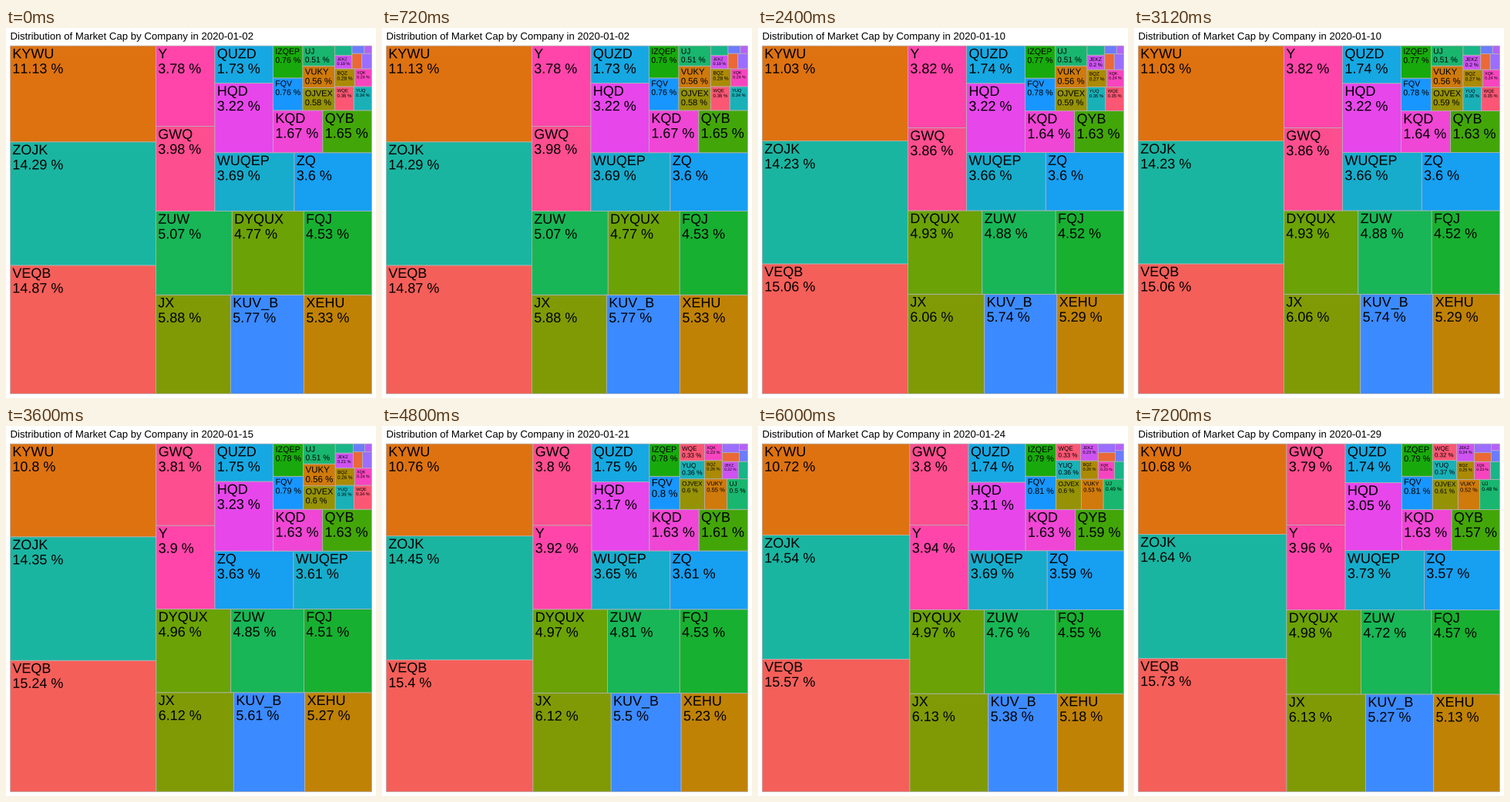
Write a matplotlib script that moves like this. It is 480x480 px and loops after 8000 ms.

```python
import matplotlib.pyplot as plt
import numpy as np
from matplotlib.animation import FuncAnimation
from matplotlib.colors import to_rgb
from matplotlib.patches import PathPatch, Rectangle
from matplotlib.textpath import TextPath
from matplotlib.transforms import Affine2D

SIZE = 480
FONT = "Liberation Sans"
LEFT, TOP, RIGHT, BOTTOM = 5.5, 23.1, 474.5, 474.5
PAD = 2.83
MAX_SIZE, MIN_SIZE = 18, 4
LINE_STEP = 1.08
STEP_MS, HOLD, FRAMES = 400, 3, 20

plt.rcParams["text.kerning_factor"] = 6  # plain advances, no kerning

DAYS = ["02", "07", "10", "15", "21", "24", "29"]

# Shares move straight between key days; the count of shares picks the days.
KEY_DAYS = {1: [0], 2: [0, 6], 3: [0, 3, 6], 4: [0, 1, 3, 6]}

# In hue order, so the position in the dict also gives the colour.
SHARES = {
    "VEQB": (14.87, 14.87, 15.24, 15.73),
    "ZVQ": (0.12,),
    "KYWU": (11.13, 11.26, 10.8, 10.68),
    "VUKY": (0.556, 0.56, 0.52),
    "XEHU": (5.33, 5.314, 5.274, 5.13),
    "BQZ": (0.28, 0.25),
    "OJVEX": (0.58, 0.61),
    "JX": (5.88, 6.01, 6.12, 6.13),
    "DYQUX": (4.77, 4.9, 4.96, 4.98),
    "QYB": (1.65, 1.63, 1.63, 1.57),
    "IZQEP": (0.76, 0.794),
    "FQJ": (4.53, 4.53, 4.51, 4.57),
    "ZUW": (5.07, 4.91, 4.85, 4.72),
    "UJ": (0.514, 0.51, 0.48),
    "QIB": (0.13,),
    "ZOJK": (14.29, 14.11, 14.35, 14.64),
    "YUQ": (0.34, 0.37),
    "WUQEP": (3.69, 3.7, 3.61, 3.73),
    "QUZD": (1.73, 1.74, 1.75, 1.74),
    "ZQ": (3.6, 3.58, 3.63, 3.57),
    "FQV": (0.764, 0.814),
    "KUV_B": (5.77, 5.87, 5.61, 5.27),
    "EQW": (0.075,),
    "HZU": (0.12,),
    "DJQ": (0.045,),
    "JEKZ": (0.184, 0.244),
    "HQD": (3.22, 3.21, 3.23, 3.05),
    "KQD": (1.67, 1.64, 1.634, 1.63),
    "XQK": (0.24, 0.23),
    "Y": (3.78, 3.75, 3.9, 3.96),
    "GWQ": (3.98, 3.92, 3.81, 3.79),
    "WQE": (0.36, 0.32),
}

# Key colours around the hue wheel, blended for the places between.
WHEEL = {0: "#F55F5A", 2: "#DE7211", 4: "#C08205", 8: "#6BA206",
         10: "#18AA0C", 12: "#18B656", 15: "#1AB5A1", 18: "#16A8E2",
         20: "#1896FF", 21: "#3C8AFF", 23: "#9B6EFF", 26: "#E746EB",
         29: "#FF45A9", 31: "#FB5774"}


def wheel_color(place):
    channels = zip(*map(to_rgb, WHEEL.values()))
    return [np.interp(place, list(WHEEL), c) for c in channels]


COLORS = {name: wheel_color(i) for i, name in enumerate(SHARES)}


def shares_on(day):
    """Name and share of every company, largest first."""
    pairs = [(name, np.interp(day, KEY_DAYS[len(keys)], keys))
             for name, keys in SHARES.items()]
    return sorted(pairs, key=lambda p: -p[1])


def worst_aspect(values, side, scale):
    """Worst aspect ratio if the values fill one strip along the side."""
    depth = sum(values) * scale / side
    lengths = [v * scale / depth for v in values]
    return max(max(depth / n, n / depth) for n in lengths)


def squarify(pairs):
    """Yield name, share and box (x, y, w, h) in a unit square."""
    x, y, w, h = 0, 0, 1, 1
    scale = 1 / sum(share for _, share in pairs)
    while pairs:
        side = min(w, h)
        values = [share for _, share in pairs]
        count = 1
        while (count < len(pairs)
               and worst_aspect(values[:count + 1], side, scale)
               <= worst_aspect(values[:count], side, scale)):
            count += 1
        depth = sum(values[:count]) * scale / side
        along = 0
        for name, share in pairs[:count]:
            length = share * scale / depth
            if w < h:
                yield name, share, (x + along, y, length, depth)
            else:
                yield name, share, (x, y + along, depth, length)
            along += length
        if w < h:
            y, h = y + depth, h - depth
        else:
            x, w = x + depth, w - depth
        pairs = pairs[count:]


fig = plt.figure(figsize=(SIZE / 72, SIZE / 72), dpi=72, facecolor="white")
ax = fig.add_axes([0, 0, 1, 1])


def text_path(text, size):
    return TextPath((0, 0), text, size=size, prop={"family": FONT})


def em_width(text):
    return text_path(text, 1).get_extents().width + 0.07


def label(x, y, text, size):
    place = Affine2D().scale(1, -1).translate(x, y) + ax.transData
    ax.add_patch(PathPatch(text_path(text, size), facecolor="black",
                           linewidth=0, transform=place, snap=False))


def draw_tile(name, share, box):
    x, y, w, h = box
    w, h = w * (RIGHT - LEFT), h * (BOTTOM - TOP)
    x = LEFT + x * (RIGHT - LEFT)
    y = BOTTOM - y * (BOTTOM - TOP) - h
    ax.add_patch(Rectangle((x, y), w, h, facecolor=COLORS[name],
                           edgecolor="#B3B3B3", linewidth=0.75, snap=False))
    lines = [name, f"{round(share, 2):g} %"]
    size = min(MAX_SIZE,
               (w - 2 * PAD) / max(map(em_width, lines)),
               (h - 2 * PAD) / 2)
    if size < MIN_SIZE:
        return
    base = y + PAD + 0.74 * size
    for i, text in enumerate(lines):
        label(x + PAD, base + i * LINE_STEP * size, text, size)


def draw(frame):
    day = frame // HOLD
    ax.clear()
    ax.set(xlim=(0, SIZE), ylim=(SIZE, 0))
    ax.axis("off")
    label(5.5, 15, "Distribution of Market Cap by Company in 2020-01-"
          + DAYS[day], 13.2)
    for tile in squarify(shares_on(day)):
        draw_tile(*tile)
    return []


anim = FuncAnimation(fig, draw, frames=FRAMES, init_func=lambda: draw(0),
                     interval=STEP_MS, repeat=True, repeat_delay=0)
plt.show()
```
